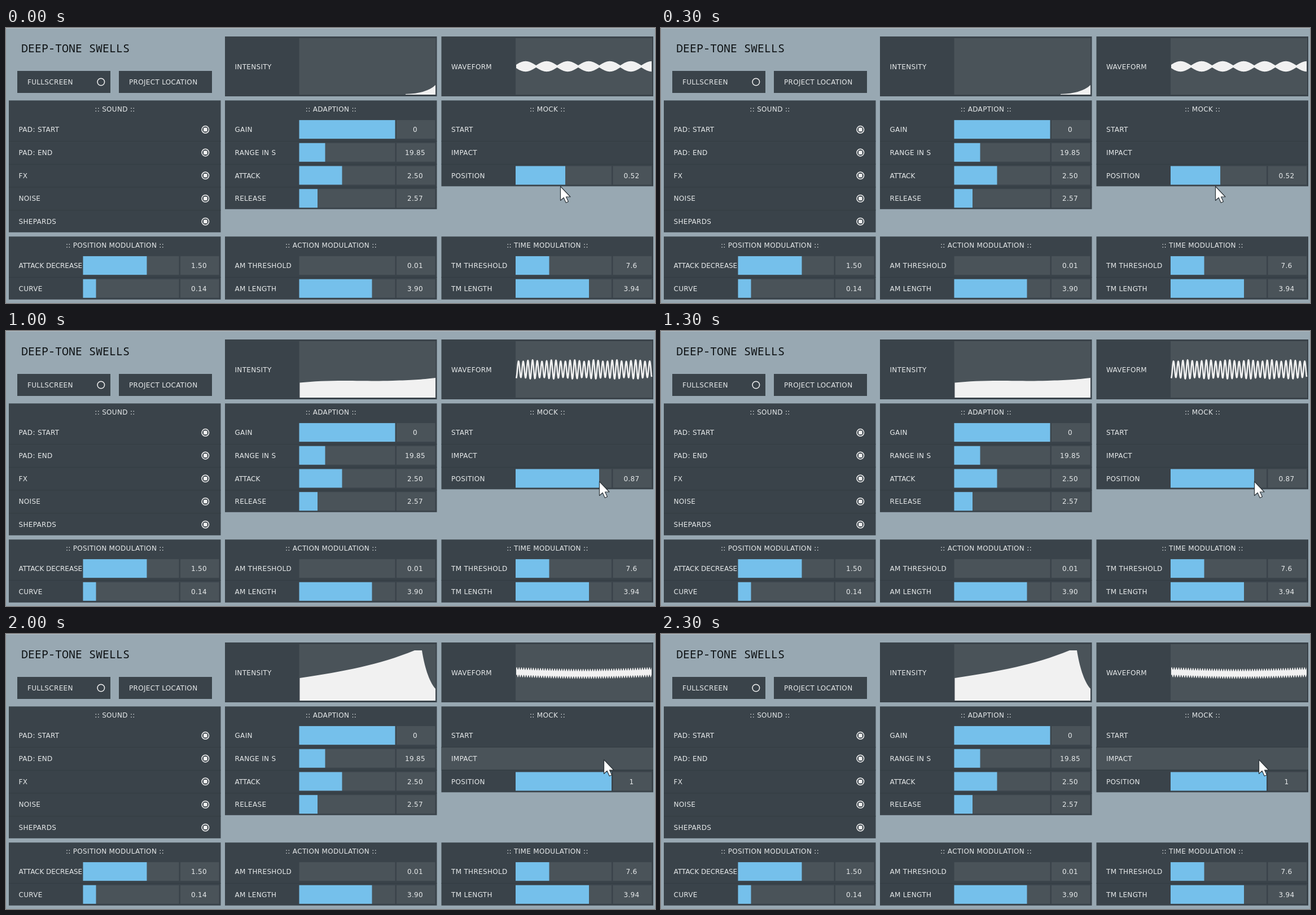
Write an HTML page that moves like this. It is 1150 px wide and 487 px high and loops after 2.5 s.

```html
<!DOCTYPE html>
<html lang="en">
<head>
<meta charset="utf-8">
<title>Synth panel</title>
<style>
  html, body { margin: 0; width: 100%; height: 100%; overflow: hidden; background: #98a8b2; }
  svg { display: block; width: 1150px; height: 487px; }
  text { font: 12px "DejaVu Sans", Verdana, sans-serif; letter-spacing: .32px; fill: #e6e9ea; white-space: pre; }
  .mid { text-anchor: middle; }
  .tight { letter-spacing: -.05px; }
  .title { font: 300 20px "Noto Sans Mono", "DejaVu Sans Mono", monospace; letter-spacing: 0; fill: #0d1113; }
</style>
</head>
<body>
<svg id="stage" viewBox="0 0 1150 487"></svg>
<script>
const PANEL = '#3a434a', TRACK = '#4a5359', BLUE = '#75c0eb', WHITE = '#f1f1f1', LINE = '#333c42';
const ROW = 40.7;
const COLS = [5, 388, 771.5];
const stage = document.getElementById('stage');

function add(tag, attrs, content) {
  const el = document.createElementNS('http://www.w3.org/2000/svg', tag);
  for (const k in attrs) el.setAttribute(k, attrs[k]);
  if (content !== undefined) el.textContent = content;
  stage.appendChild(el);
  return el;
}
const rect = (x, y, width, height, fill) => add('rect', { x, y, width, height, fill });
const text = (x, mid, str, cls = '') => add('text', { x, y: mid + 4.5, class: cls }, str);
const ring = (cx, cy) => add('circle', { cx, cy, r: 6.3, fill: 'none', stroke: WHITE, 'stroke-width': 1.5 });

function label(x, mid, str) {
  text(x + 17.5, mid, str, str.startsWith('ATTACK') ? 'tight' : '');
}

function slider(x, mid, fill, value) {
  rect(x + 131.5, mid - 16.5, 170, 33, TRACK);
  rect(x + 304, mid - 16.5, 68.5, 33, TRACK);
  const bar = rect(x + 131.5, mid - 16.5, fill, 33, BLUE);
  return { bar, value: text(x + 337, mid, value, 'mid') };
}

// Rows: [label], [label, 'radio'] or [label, fill, value]
function panel(col, y, height, title, rows) {
  const x = COLS[col];
  rect(x, y, 375.5, height, PANEL);
  text(x + 188, y + 15, ':: ' + title + ' ::', 'mid');
  return rows.map(([name, fill, value], i) => {
    const mid = y + 51.3 + i * ROW, top = y + 31 + i * ROW;
    const hover = rect(x, top + .5, 375.5, ROW - 1, TRACK);
    hover.style.display = 'none';
    if (i) rect(x, top, 375.5, 1, LINE);
    let parts = {};
    if (fill === 'radio') {
      ring(x + 348.3, mid + .3);
      add('rect', { x: x + 345, y: mid - 3, width: 6.6, height: 6.6, rx: 1.5, fill: WHITE });
    } else if (value !== undefined) parts = slider(x, mid, fill, value);
    label(x, mid, name);
    return { hover, ...parts };
  });
}

function graph(col, name) {
  const x = COLS[col];
  rect(x, 15, 375.5, 106, PANEL);
  rect(x + 131.5, 18, 242, 100, TRACK);
  label(x, 68, name);
  return add('path', { fill: WHITE, stroke: WHITE, 'stroke-width': 0, 'stroke-linejoin': 'round' });
}

// Static interface
rect(0, 0, 1150, 487, '#98a8b2');
rect(0, 0, 1150, 1, '#b4c0c7');
add('text', { x: 27, y: 43, class: 'title' }, 'DEEP-TONE SWELLS');
rect(20, 76, 165, 39, PANEL);
rect(200, 76, 165, 39, PANEL);
text(38, 95.5, 'FULLSCREEN');
text(218, 95.5, 'PROJECT LOCATION');
ring(168.3, 95.5);

const intensity = graph(1, 'INTENSITY');
const waveform = graph(2, 'WAVEFORM');

panel(0, 128.3, 233.5, 'SOUND',
  ['PAD: START', 'PAD: END', 'FX', 'NOISE', 'SHEPARDS'].map(n => [n, 'radio']));
panel(1, 128.3, 192.5, 'ADAPTION', [
  ['GAIN', 170, '0'], ['RANGE IN S', 46, '19.85'], ['ATTACK', 76, '2.50'], ['RELEASE', 32.5, '2.57']]);
const [, impact, position] = panel(2, 128.3, 152, 'MOCK', [['START'], ['IMPACT'], ['POSITION', 88, '0.52']]);
panel(0, 369.3, 111.5, 'POSITION MODULATION', [['ATTACK DECREASE', 113, '1.50'], ['CURVE', 23, '0.14']]);
panel(1, 369.3, 111.5, 'ACTION MODULATION', [['AM THRESHOLD', 0, '0.01'], ['AM LENGTH', 129, '3.90']]);
panel(2, 369.3, 111.5, 'TIME MODULATION', [['TM THRESHOLD', 59.5, '7.6'], ['TM LENGTH', 130, '3.94']]);

const cursor = add('path', {
  d: 'M0 0V25L5.6 20L9.8 29L14 27L10 18.5H17.5Z',
  fill: '#fff', stroke: '#2c3439', 'stroke-width': 1.2, 'stroke-linejoin': 'round'
});

// Waveforms: x runs from 0 to 240
const wave = (x, period, shift = 0) => Math.sin(2 * Math.PI * (x - shift) / period);

function trace(f, step = .5) {
  const pts = [];
  for (let x = 0; x <= 240; x += step) pts.push((904 + x).toFixed(1) + ' ' + (68 + f(x)).toFixed(1));
  return pts;
}
const line = (f, width) => ({ d: 'M' + trace(f).join('L'), width });
const band = (up, down) => ({ d: 'M' + trace(x => -up(x)).concat(trace(down).reverse()).join('L') + 'Z', width: 0 });

const bead = x => 1.8 + 7.4 * Math.abs(wave(x, 74.6, -2));
const spike = s => x => 18.5 + 5 * wave(x, 15.3, s) + 3.5 * Math.sign(wave(x, 5.1, s));
const sag = x => 3 * Math.sin(Math.PI * x / 240);

const steps = [
  { fill: 88, value: '0.52', tip: [982.5, 280.5],
    area: 'M708 118V117Q745 116 761 101V118Z', wave: band(bead, bead) },
  { fill: 127.5, value: '0.75', tip: [1037, 266.5],
    area: 'M520 118V117C548 117 554 109 565 101.7C620 99 655 103.5 690 103.5S740 100 761 98V118Z',
    wave: line(x => (8 + 1.6 * wave(x, 37)) * wave(x, 5.7), 2.6) },
  { fill: 148, value: '0.87', tip: [1051.5, 266.5],
    area: 'M520.5 118V91.5C545 89 570 88 600 88S650 89 685 88S735 86 761 83V118Z',
    wave: line(x => (-15.5 + 1.3 * wave(x, 37)) * wave(x, 8.3, 2.1), 2.6) },
  { fill: 170, value: '1', tip: [1082, 262],
    area: 'M520.5 118V88.7C610 88 680 83 761 67V118Z',
    wave: band(spike(6), spike(1)) },
  { fill: 170, value: '1', tip: [1059.5, 222.5], hover: true,
    area: 'M520.5 118V78C600 66 660 55 724 29H737C741 55 749 84 761 97V118Z',
    wave: band(x => 7.2 - sag(x) + 2.4 * wave(x, 4.2), x => 6.2 + sag(x) + 2.4 * wave(x, 4.2, 2)) }
];

function show(s) {
  intensity.setAttribute('d', s.area);
  waveform.setAttribute('d', s.wave.d);
  waveform.setAttribute('fill', s.wave.width ? 'none' : WHITE);
  waveform.setAttribute('stroke-width', s.wave.width);
  position.bar.setAttribute('width', s.fill);
  position.value.textContent = s.value;
  impact.hover.style.display = s.hover ? '' : 'none';
  cursor.setAttribute('transform', `translate(${s.tip})`);
}

const HOLD = 500, start = performance.now();
let current = -1;
function tick() {
  const next = Math.floor((performance.now() - start) / HOLD) % steps.length;
  if (next !== current) show(steps[current = next]);
  requestAnimationFrame(tick);
}
tick();
</script>
</body>
</html>
```
